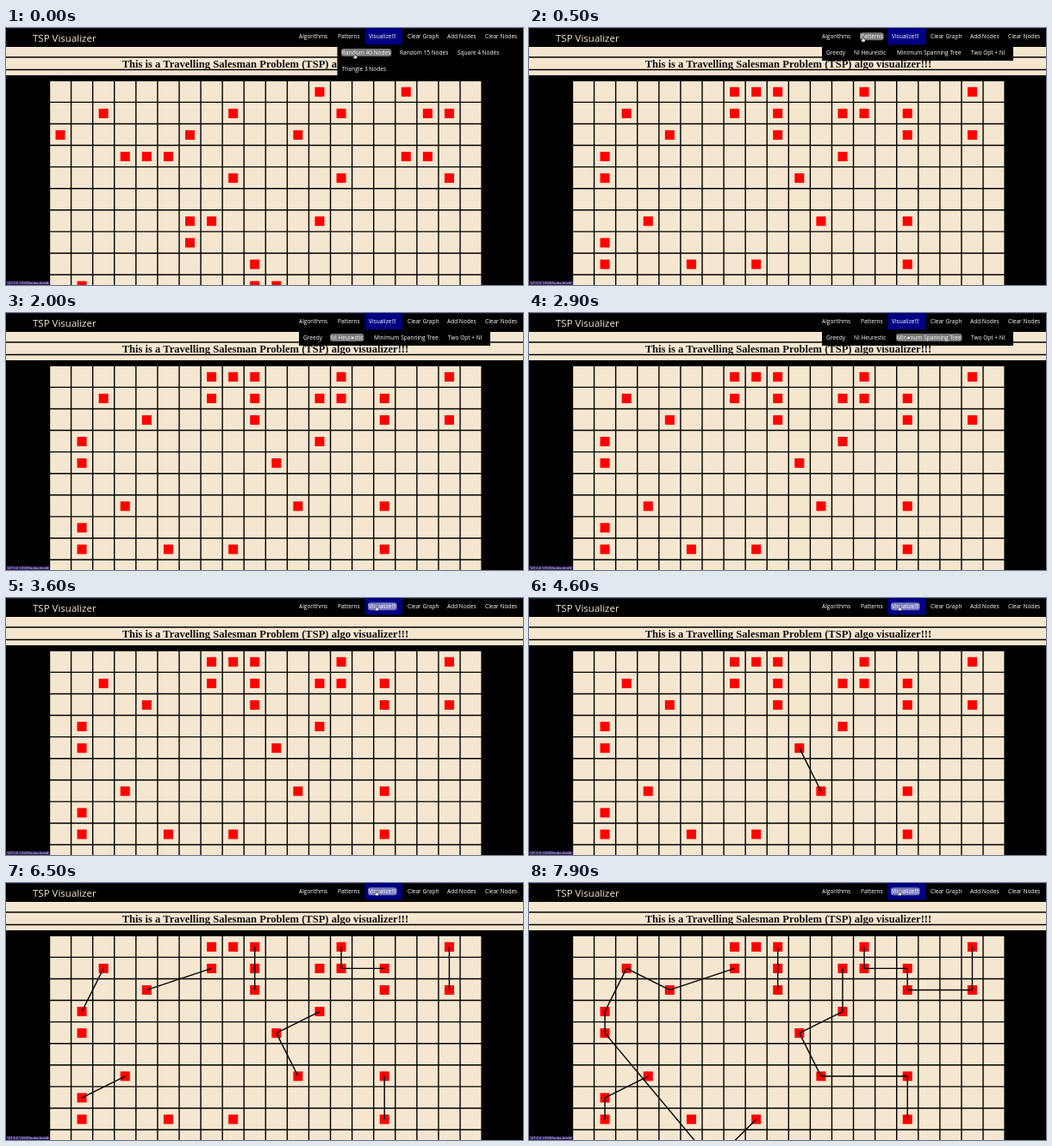
Animation of 600 by 299 pixels, one loop 8000 ms. Source, as an HTML page:

```html
<!DOCTYPE html>
<html lang="en">
<head>
<meta charset="utf-8">
<title>TSP Visualizer</title>
<style>
  html, body { margin: 0; width: 100%; height: 100%; overflow: hidden; background: #000; }
  svg { display: block; width: 600px; height: 299px; font: 500 6.55px "Open Sans", sans-serif; fill: #f5e6d0; }
  .title { font-size: 11.5px; }
  .heading { font: bold 12.55px "Liberation Serif", serif; fill: #111; }
  .status { font-size: 3.8px; fill: #fff; }
  .menu { fill: #fff; }
  .hover { fill-opacity: .47; }
  .lines { stroke: #000; stroke-width: 1.4; fill: none; }
  .node { fill: #f00; }
</style>
</head>
<body>
<svg viewBox="0 0 600 299">
  <rect width="600" height="299" fill="#000"/>
  <rect width="600" height="1" fill="#1b1036"/>
  <rect y="22" width="600" height="33"/>
  <path class="lines" d="M0 34H600M0 48.5H600"/>
  <text class="heading" x="134.7" y="45.7">This is a Travelling Salesman Problem (TSP) algo visualizer!!!</text>
  <text class="title" x="31" y="15.6">TSP Visualizer</text>
  <rect x="416.5" width="43.5" height="19.5" fill="#000084"/>
  <rect x="50.5" y="61" width="501.5" height="238"/>
  <path class="lines" id="grid"/>
  <g id="firstBoard"></g>
  <g id="nextBoard"></g>
  <path class="lines" id="route"/>
  <rect y="294.5" width="51" height="4.5" fill="#2b1a55"/>
  <text class="status" x="1" y="298.2">127.0.0.1:5500/index.html#</text>
  <g class="menu" id="nav"></g>
  <g class="menu" id="patterns"><rect x="384.5" y="19.5" width="215.5" height="36.5" fill="#000"/></g>
  <g class="menu" id="algorithms"><rect x="340" y="19.5" width="222" height="18.5" fill="#000"/></g>
  <path id="cursor" d="M-.8-2.4Q0-3 .6-2.3V-.7L2.2-.2Q2.8 0 2.5 1L2 2.7H-1L-2.3.7Q-2.2-.2-1.3.2L-.8.7Z"
        fill="#fff" stroke="#000" stroke-width=".5"/>
</svg>
<script>
const LOOP = 8000, STEP = 100, CELL = 25.08, COLS = 20, ROWS = 10;
const get = id => document.getElementById(id);
const show = (el, on) => el.style.display = on ? '' : 'none';

// Cells are named like chess squares: column letter, row number
const place = cell => [63 + CELL * (cell.charCodeAt(0) - 97), 74.3 + CELL * cell.slice(1)];

// Strokes of the tour in drawing order, cut into single edges
const strokes = 'k4-l6 d6-b7 n0-n1-p1 h1-e2 j1-j2 p6-p8 c1-b3 s0-s2 j0-j1 m3-k4 '
  + 'p1-p2-s2 b7-b8 l6-p6 b3-b4-g10-i8 c1-e2 m1-m3';
const edges = strokes.split(' ').flatMap(stroke => {
  const cells = stroke.split('-');
  return cells.slice(1).map((cell, i) => [cells[i], cell]);
});
const loneCells = ['h0', 'i0', 'f8'];

// One edge every 150 ms, with a short pause after the seventh
const edgeTime = i => 4600 + 150 * i + (i > 6 ? 350 : 0);

function randomCells(count, seed) {
  const random = () => (seed = seed * 16807 % 2147483647) / 2147483647;
  const cells = new Set();
  while (cells.size < count) {
    const letter = String.fromCharCode(97 + Math.floor(random() * COLS));
    cells.add(letter + Math.floor(random() * ROWS));
  }
  return cells;
}

function fillBoard(id, cells) {
  get(id).innerHTML = [...new Set(cells)].map(cell => {
    const [x, y] = place(cell);
    return `<rect class="node" x="${x - 5.5}" y="${y - 5.5}" width="11" height="11"/>`;
  }).join('');
}

function drawGrid() {
  let d = '';
  for (let c = 0; c <= COLS; c++) d += `M${50.5 + CELL * c} 60.6V299`;
  for (let r = 0; r < ROWS; r++) d += `M50 ${61.3 + CELL * r}H552.5`;
  get('grid').setAttribute('d', d);
}

// Adds a line of labels, each with a highlight behind it
const items = [];
function addLabels(id, y, labels) {
  for (const [text, x] of Object.entries(labels)) {
    const menu = get(id);
    menu.insertAdjacentHTML('beforeend',
      `<rect class="hover" x="${x - 1}" y="${y - 7}" height="9" rx="3"/><text x="${x}" y="${y}">${text}</text>`);
    const label = menu.lastChild, box = label.previousSibling;
    const width = label.getComputedTextLength() + 2;
    box.setAttribute('width', width);
    items.push({ menu, box, x: x - 1, y, width });
  }
}

// Pointer stops: time, x, y
const stops = [[0, 405, 33], [400, 392, 12], [1200, 357, 24], [1600, 363, 28],
  [2400, 440, 28], [2900, 440, 28], [3600, 430, 12], [LOOP, 430, 12]];

function pointerAt(t) {
  const i = stops.findIndex(stop => stop[0] > t);
  const [t0, x0, y0] = stops[i - 1], [t1, x1, y1] = stops[i];
  const k = (t - t0) / (t1 - t0);
  return [x0 + (x1 - x0) * k, y0 + (y1 - y0) * k];
}

function draw(t) {
  const [px, py] = pointerAt(t);
  get('cursor').setAttribute('transform', `translate(${px} ${py})`);
  show(get('firstBoard'), t < 200);
  show(get('nextBoard'), t >= 200);
  show(get('patterns'), t < 400);
  show(get('algorithms'), t >= 500 && t < 3200);
  for (const { box, x, y, width } of items) {
    show(box, px > x && px < x + width && py > y - 6.5 && py < y + 2.5);
  }
  get('route').setAttribute('d', edges.filter((_, i) => t >= edgeTime(i))
    .map(([a, b]) => `M${place(a)}L${place(b)}`).join(''));
}

drawGrid();
fillBoard('firstBoard', randomCells(26, 40));
fillBoard('nextBoard', edges.flat().concat(loneCells));
addLabels('nav', 12.2, { 'Algorithms': 340, 'Patterns': 385, 'Visualize!!!': 421,
  'Clear Graph': 466, 'Add Nodes': 512, 'Clear Nodes': 556 });
addLabels('patterns', 31, { 'Random 40 Nodes': 390, 'Random 15 Nodes': 457, 'Square 4 Nodes': 524 });
addLabels('patterns', 50, { 'Triangle 3 Nodes': 390 });
addLabels('algorithms', 31, { 'Greedy': 345, 'NI Heurestic': 377, 'Minimum Spanning Tree': 427, 'Two Opt + NI': 513 });

const start = performance.now();
function tick() {
  const t = (performance.now() - start) % LOOP;
  draw(Math.floor(t / STEP) * STEP);
  requestAnimationFrame(tick);
}
tick();
</script>
</body>
</html>
```
